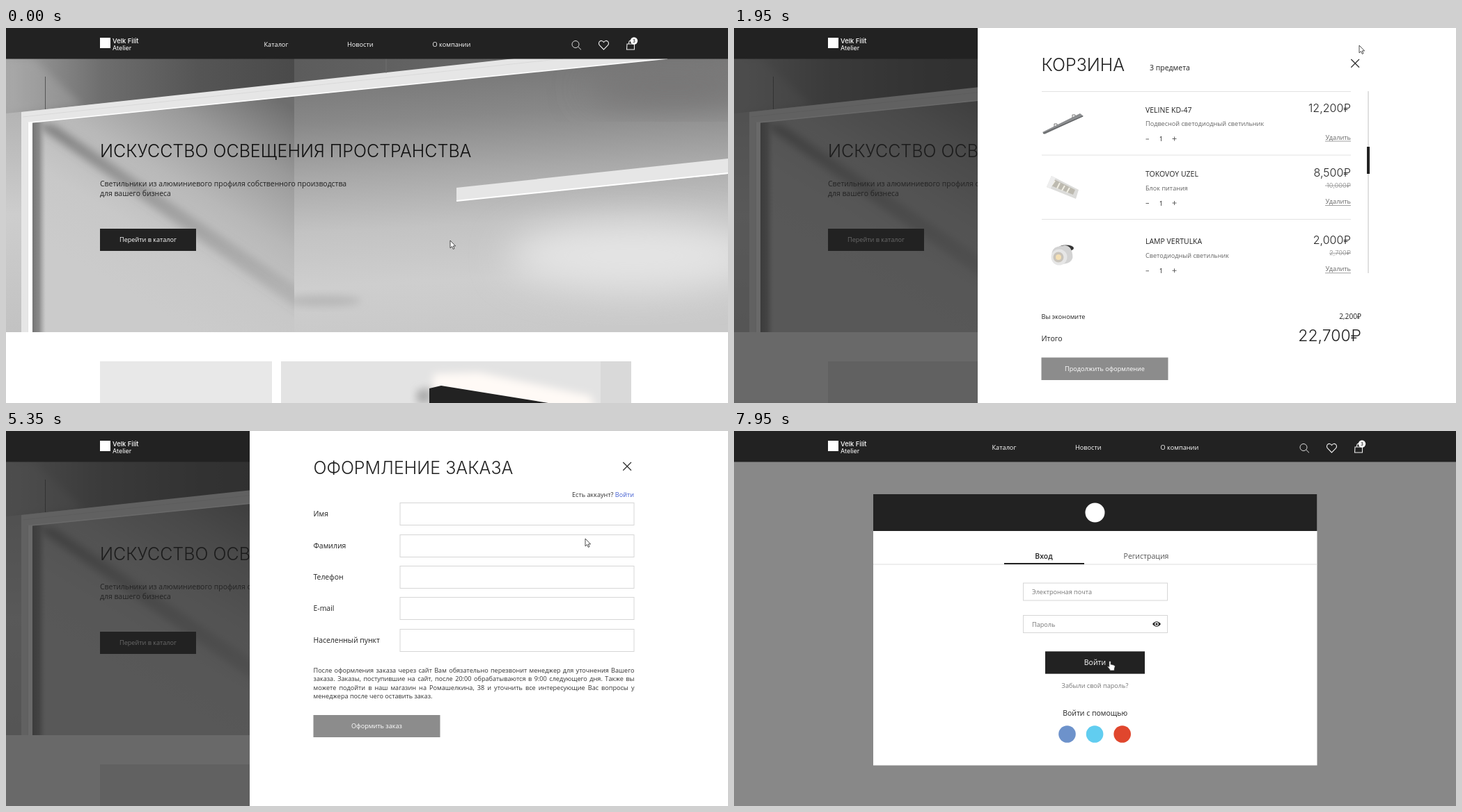
An HTML page that plays this animation: 1037 px wide and 540 px high, repeating every 8 s.

```html
<!DOCTYPE html>
<html lang="ru">
<head>
<meta charset="utf-8">
<title>Корзина и вход</title>
<style>
html, body { margin: 0; height: 100%; overflow: hidden; background: #fff; }
svg { display: block; width: 100vw; height: 100vh; font-family: "Open Sans", "Noto Sans", sans-serif; }
text { white-space: pre; }
.display { font-family: Inter, sans-serif; font-weight: 300; font-optical-sizing: none; }
.note { margin: 0; font-size: 9.1px; line-height: 12.45px; color: #333; }
.note div { white-space: nowrap; text-align: justify; text-align-last: justify; }
.note div:last-child { text-align-last: left; }
</style>
</head>
<body>
<svg id="stage" viewBox="0 0 1037 540" xmlns="http://www.w3.org/2000/svg"></svg>
<script>
const INK = '#222', IDLE = '#8c8c8c';

// Markup helpers
const text = (x, y, str, size, fill = INK, extra = '') =>
  `<text x="${x}" y="${y}" font-size="${size}" fill="${fill}" ${extra}>${str}</text>`;
const middle = (x, y, str, size, fill, extra = '') => text(x, y, str, size, fill, `text-anchor="middle" ${extra}`);
const end = (x, y, str, size, fill, extra = '') => text(x, y, str, size, fill, `text-anchor="end" ${extra}`);
const display = (x, y, str, size, fill) => text(x, y, str, size, fill, 'class="display"');
const price = (x, y, str, size, fill) => end(x, y, str, size, fill, 'class="display"');
const rect = (x, y, w, h, fill, extra = '') =>
  `<rect x="${x}" y="${y}" width="${w}" height="${h}" fill="${fill}" ${extra}/>`;
const poly = (points, fill, extra = '') => `<polygon points="${points}" fill="${fill}" ${extra}/>`;
const line = (d, stroke, width = 1, extra = '') =>
  `<path d="${d}" fill="none" stroke="${stroke}" stroke-width="${width}" ${extra}/>`;
const field = (x, y, w, h) => rect(x, y, w, h, '#fff', 'stroke="#d6d6d6"');
const gradient = (id, x1, y1, x2, y2, ...colors) =>
  `<linearGradient id="${id}" gradientUnits="userSpaceOnUse" x1="${x1}" y1="${y1}" x2="${x2}" y2="${y2}">` +
  colors.map((c, i) => `<stop offset="${i / (colors.length - 1)}" stop-color="${c}"/>`).join('') + '</linearGradient>';
const blur = (id, amount) => `<filter id="${id}" x="-50%" y="-50%" width="200%" height="200%"><feGaussianBlur stdDeviation="${amount}"/></filter>`;
const button = (x, y, w, h, label, size, id) =>
  rect(x, y, w, h, IDLE) + rect(x, y, w, h, INK, `id="${id}" opacity="0"`) +
  middle(x + w / 2, y + h / 2 + size * .38, label, size, '#fff');

const defs = `<defs>
  ${gradient('ceiling', 0, 60, 414, 60, '#a2a2a2', '#6e6e6e', '#555', '#4a4a4a')}
  ${gradient('ceilingRight', 414, 50, 760, 50, '#5c5c5c', '#686868')}
  ${gradient('wall', 370, 90, 190, 390, '#6e6e6e', '#9a9a9a', '#b8b8b8', '#c8c8c8', '#cbcbcb')}
  ${gradient('band', 38, 136, 414, 388, 'rgba(90,90,90,.65)', 'rgba(110,110,110,.4)', 'rgba(130,130,130,.25)')}
  ${gradient('room', 700, 44, 720, 438, '#747474', '#888', '#a8a8a8', '#c3c3c3', '#cecece', '#c9c9c9')}
  ${gradient('side', 0, 100, 0, 438, '#b0b0b0', '#cdcdcd', '#c2c2c2')}
  ${gradient('postShade', 38, 0, 57, 0, '#747474', '#8a8a8a', 'rgba(160,160,160,0)')}
  ${blur('soft', 6)}${blur('wide', 26)}
  <clipPath id="hero"><rect y="44" width="1037" height="394"/></clipPath>
  <clipPath id="lit"><rect x="414" y="44" width="623" height="394"/></clipPath>
  <clipPath id="leftWall"><rect y="44" width="414" height="394"/></clipPath>
  <clipPath id="card"><rect x="395" y="480" width="503" height="60"/></clipPath>
</defs>`;

const header = rect(0, 0, 1037, 44.5, INK) +
  rect(135, 14, 15, 15, '#fff') +
  text(153, 22, 'Velk Filit', 9.4, '#fff', 'font-family="Inter, sans-serif" font-weight="500"') +
  text(153, 32, 'Atelier', 9, '#fff', 'font-family="Inter, sans-serif"') +
  text(370.5, 27.3, 'Каталог', 9.2, '#fff') +
  text(490, 27.3, 'Новости', 9.2, '#fff') +
  text(612.5, 27.3, 'О компании', 9.2, '#fff') +
  line('M823 23.5a5 5 0 1 1 -10 0a5 5 0 1 1 10 0M821.6 27L826 31.3', '#ddd') +
  line('M858.5 31L852.6 25C849 20.5 855 15.5 858.5 20.5C862 15.5 868 20.5 864.4 25Z', '#eee', 1.1) +
  line('M892 23H902.5V31H891.5ZM894.5 23C894.5 16.5 900 16.5 900 23', '#eee', 1.1) +
  '<circle cx="902" cy="18.5" r="5.2" fill="#fff"/>' +
  middle(902, 20.8, '3', 6.2, INK, 'font-weight="600"');

const photo = `<g clip-path="url(#hero)">
  ${rect(414, 44, 623, 394, 'url(#room)')}
  <g clip-path="url(#lit)">
    <ellipse cx="900" cy="328" rx="180" ry="50" fill="#e4e4e4" filter="url(#wide)"/>
    <ellipse cx="960" cy="85" rx="130" ry="25" fill="#757373" filter="url(#wide)"/>
    <ellipse cx="455" cy="393" rx="55" ry="8" fill="#b8b8b8" filter="url(#soft)"/>
  </g>
  ${rect(0, 44, 414, 394, 'url(#wall)')}
  ${rect(0, 44, 38, 394, 'url(#side)')}
  ${poly('0,44 414,44 414,80 0,123', 'url(#ceiling)')}
  ${poly('0,44 40,44 110,112 0,123', '#bbb', 'opacity=".3" filter="url(#soft)"')}
  ${poly('414,44 730,44 414,80', 'url(#ceilingRight)')}
  <g clip-path="url(#leftWall)">${poly('38,136 70,140 430,380 430,412', 'url(#band)', 'filter="url(#soft)"')}</g>
  ${rect(38, 136, 19, 302, 'url(#postShade)')}
  ${poly('22,121 730,44 950,44 38,136 38,438 22,438', '#e6e6e6')}
  ${rect(31, 136, 7, 302, '#fff')}
  ${line('M31 136.5L950 44', '#fff', 1.5)}
  ${line('M31.5 136V438M24 128L800 44', '#d4d4d4', .7)}
  ${line('M56.5 70V117', '#444', .8)}
  ${line('M546 44V65', '#777', .7)}
  ${poly('647,230 1037,188 1037,210 647,249', '#e6e6e6')}
  ${line('M647 249L1037 209', '#fff', 2)}
</g>`;

const page = rect(0, 0, 1037, 540, '#fff') + photo +
  display(135, 186, 'ИСКУССТВО ОСВЕЩЕНИЯ ПРОСТРАНСТВА', 25, '#111') +
  text(135, 227.5, 'Светильники из алюминиевого профиля собственного производства', 10.45) +
  text(135, 242, 'для вашего бизнеса', 10.45) +
  rect(135, 289, 138, 32, INK) + middle(204, 308.4, 'Перейти в каталог', 9.15, '#fff') +
  rect(135, 480, 247, 60, '#e8e8e8') +
  `<g clip-path="url(#card)">${rect(395, 480, 503, 60, '#e3e3e3')}${rect(854, 480, 44, 60, '#d9d9d9')}
    ${poly('614,498 680,496 840,530 850,560 612,525', '#fffaf6', 'filter="url(#soft)"')}
    ${poly('590,522 610,518 610,540 590,540', '#aaa', 'filter="url(#soft)"')}
    ${poly('608,519 625,515 785,541 608,541', INK)}</g>`;

const closeIcon = line('M886.3 45L898 56.7M898 45L886.3 56.7', '#333', 1.3);
const panel = rect(350, 0, 687, 540, '#fff') + closeIcon;

const cartRow = (dy, name, kind, cost, oldCost) => `<g transform="translate(0 ${dy})">` +
  text(591, 121.6, name, 10.5, INK, 'font-weight="500"') +
  text(591, 141, kind, 9.13, '#666') +
  line('M591.5 160H596M629.5 159.5H635.5M632.5 156.5V162.5', '#555', .9) +
  middle(613.5, 163, '1', 9.5) +
  price(886, 121, cost, 16, INK) +
  (oldCost ? price(886, 137.7, oldCost, 9.3, '#888') + line(`M${oldCost.length > 6 ? 849 : 855} 134.5H886`, '#888', .8) : '') +
  end(886, 160.6, 'Удалить', 9.2, '#666') + line('M849 163H886', '#888', .8) + '</g>';

const products =
  poly('443,150 497,123 502,127 446,153', '#8b8d8f') + line('M444 152L501 127', '#5b5d5f', 1.2) +
  line('M460 142v-4h4v2M486 129v-4h4v2', '#777', 1) +
  poly('456,213 495,233 491,246 449,229', '#dcdcda') + poly('458,217 490,233 487,240 453,226', '#bdbab0') +
  line('M461 220L456 227M468 223L464 231M475 227L471 234M482 230L478 237', '#f1efe4', 2) +
  poly('456,213 462,216 455,231 449,229', '#eee') +
  '<ellipse cx="477" cy="317" rx="11" ry="4.5" fill="#333"/>' +
  '<rect x="457" y="314" width="29" height="26" rx="10" fill="#d3d3d3" transform="rotate(-12 471 327)"/>' +
  '<circle cx="467" cy="330" r="11.5" fill="#e6e6e6"/><circle cx="466" cy="330" r="7.5" fill="#c9c4bb"/>' +
  '<circle cx="466" cy="330" r="4" fill="#f4dfb4"/>';

const cart = panel +
  display(441.5, 61.7, 'КОРЗИНА', 25) +
  text(597, 61, '3 предмета', 10.5, INK, 'font-weight="500"') +
  line('M442 91.5H886M442 183H886M442 275.5H886', '#e2e2e2') +
  products +
  cartRow(0, 'VELINE KD-47', 'Подвесной светодиодный светильник', '12,200₽') +
  cartRow(92.5, 'TOKOVOY UZEL', 'Блок питания', '8,500₽', '10,000₽') +
  cartRow(189.8, 'LAMP VERTULKA', 'Светодиодный светильник', '2,000₽', '2,700₽') +
  line('M911 91V353', '#ccc', 1.2) + rect(909, 171, 4, 39, INK) +
  text(441.5, 418.5, 'Вы экономите', 9.15) + end(901, 418.5, '2,200₽', 10.2) +
  text(441.5, 450.5, 'Итого', 10.6, INK, 'font-weight="500"') + price(901, 450.5, '22,700₽', 23) +
  button(441.5, 474.5, 182, 32.5, 'Продолжить оформление', 9.12, 'cartHover');

const noteLines = [
  'После оформления заказа через сайт Вам обязательно перезвонит менеджер для уточнения Вашего',
  'заказа. Заказы, поступившие на сайт, после 20:00 обрабатываются в 9:00 следующего дня. Также вы',
  'можете подойти в наш магазин на Ромашелкина, 38 и уточнить все интересующие Вас вопросы у',
  'менеджера после чего оставить заказ.'
];
const formRows = [['Имя', 103.5], ['Фамилия', 149.5], ['Телефон', 194.5], ['E-mail', 239.5], ['Населенный пункт', 285.5]];

const form = panel +
  display(441.5, 61.7, 'ОФОРМЛЕНИЕ ЗАКАЗА', 25) +
  end(902, 95.4, 'Есть аккаунт? <tspan fill="#3f5bd0">Войти</tspan>', 9.1, '#333') +
  formRows.map(([label, y]) => text(441.5, y + 19.8, label, 10.45) + field(566, y, 336, 32)).join('') +
  `<foreignObject x="441.5" y="338.8" width="461" height="60"><div xmlns="http://www.w3.org/1999/xhtml" class="note">
    ${noteLines.map(s => `<div>${s}</div>`).join('')}</div></foreignObject>` +
  button(441.5, 409, 182, 32, 'Оформить заказ', 9.15, 'formHover');

const login = rect(0, 0, 1037, 540, '#888') + header +
  rect(200, 91, 637.5, 390.5, '#fff') + rect(200, 91, 637.5, 53, INK) +
  '<circle cx="518.5" cy="117.5" r="14" fill="#fff"/>' +
  line('M200 192H837.5', '#ddd') + rect(388, 190, 115, 2, INK) +
  middle(445, 184, 'Вход', 10.45, INK, 'font-weight="600"') +
  middle(592, 184, 'Регистрация', 10.55, '#555', 'font-weight="500"') +
  field(415.5, 219, 207, 25) + text(428, 234.6, 'Электронная почта', 9.12, '#777') +
  field(415.5, 265.5, 207, 25) + text(428, 281.6, 'Пароль', 9.12, '#777') +
  `<path d="M601 278Q607 270.5 613 278Q607 285.5 601 278Z" fill="${INK}"/>` +
  `<circle cx="607" cy="278" r="2.2" fill="${INK}" stroke="#fff" stroke-width="1.2"/>` +
  button(447, 317.5, 143, 32, 'Войти', 10.5, 'loginHover') +
  middle(518.5, 369.8, 'Забыли свой пароль?', 9.15, '#777') +
  middle(518.7, 409.5, 'Войти с помощью', 10.5) +
  ['#6d92cb', '#61cdf0', '#e0462d'].map((c, i) => `<circle cx="${478.5 + i * 39.6}" cy="436.5" r="12.3" fill="${c}"/>`).join('');

const pointer = `<g id="pointer" stroke="${INK}" stroke-width=".8" stroke-linejoin="round" fill="#fff">
  <path id="arrow" d="M0 0V10.8L2.5 8.5L4.3 12.4L6 11.6L4.3 7.9H7.6Z"/>
  <path id="hand" d="M-1.3 1Q0 -.8 1.2 1V5.2Q2.6 4.5 3.4 5.7Q4.8 5.2 5.5 6.3Q7.3 6 7.3 8L6.3 12V14H-.2V12.5L-3.6 8.6Q-3.2 7 -1.3 8.5Z"/></g>`;

const group = (id, body) => `<g id="${id}">${body}</g>`;
document.getElementById('stage').innerHTML = defs + page +
  rect(0, 44, 350, 496, INK, 'id="dim"') + header +
  group('cart', cart) + group('form', form) + group('login', login) + pointer;

// Animation
const LOOP = 8000;
const parts = Object.fromEntries(
  ['dim', 'cart', 'form', 'login', 'pointer', 'arrow', 'hand', 'cartHover', 'loginHover']
    .map(id => [id, document.getElementById(id)]));

const progress = (t, from, to) => Math.min(1, Math.max(0, (t - from) / (to - from)));
const smooth = u => u * u * (3 - 2 * u);
const fade = (t, from, to) => smooth(progress(t, from, to));

// Pointer stops: time, x, y
const stops = [
  [49, 638, 306], [50, 682, 264], [170, 682, 264], [950, 901, 23],
  [1900, 901, 23], [1950, 898, 25], [2100, 882, 32], [2420, 607, 170], [2650, 612, 310], [2960, 849, 421],
  [3020, 849, 421], [3650, 567, 489], [4570, 567, 489], [5350, 832, 155],
  [5400, 832, 155], [5850, 873, 91], [7080, 873, 91], [7350, 734, 182], [7950, 540, 331]
];

function pointerAt(t) {
  const next = stops.findIndex(s => s[0] > t);
  if (next === 0) return stops[0].slice(1);
  if (next < 0) return stops.at(-1).slice(1);
  const [a, b] = [stops[next - 1], stops[next]];
  const u = fade(t, a[0], b[0]);
  return [a[1] + (b[1] - a[1]) * u, a[2] + (b[2] - a[2]) * u];
}

function show(part, opacity) {
  part.style.opacity = opacity;
  part.style.display = opacity > 0 ? '' : 'none';
}

function draw(t) {
  const cartIn = fade(t, 1310, 1810);
  show(parts.dim, cartIn * .68);
  show(parts.cart, cartIn);
  show(parts.form, progress(t, 4105, 4405));
  show(parts.login, fade(t, 6525, 7025));
  show(parts.cartHover, progress(t, 3430, 3580));
  show(parts.loginHover, progress(t, 7660, 7800));
  const isHand = (t >= 3430 && t < 4600) || t >= 7700;
  show(parts.hand, +isHand);
  show(parts.arrow, +!isHand);
  const [x, y] = pointerAt(t);
  parts.pointer.setAttribute('transform', `translate(${x} ${y})`);
}

const start = performance.now();
function tick() {
  draw((performance.now() - start) % LOOP);
  requestAnimationFrame(tick);
}
tick();
</script>
</body>
</html>
```
